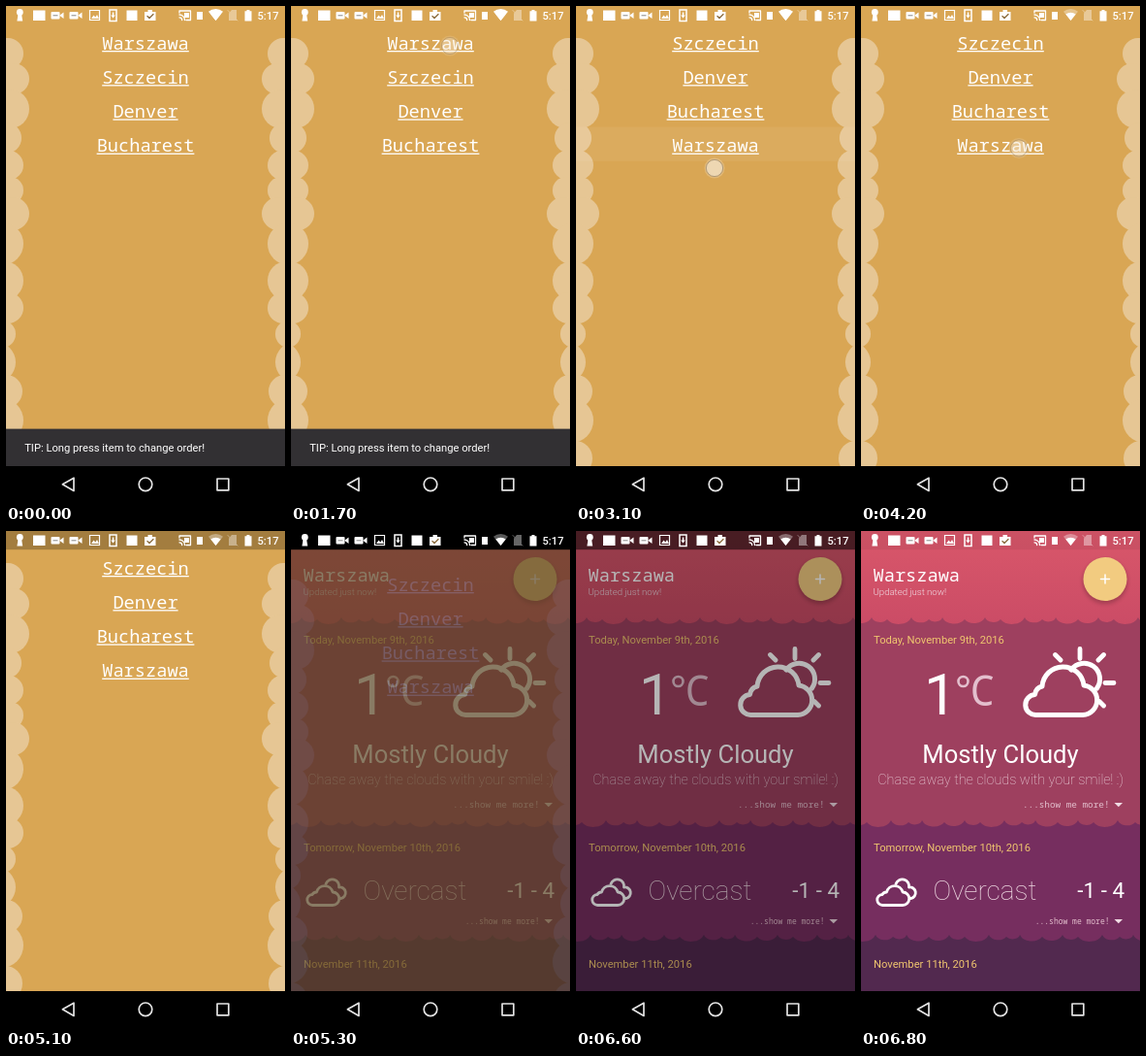
An HTML page for the animation above (6900 ms loop, 288 by 512 pixels).

```html
<!DOCTYPE html>
<html lang="en">
<head>
<meta charset="utf-8">
<title>City list and forecast</title>
<style>
  html, body { margin: 0; width: 100%; height: 100%; overflow: hidden; background: #000; }
  svg { display: block; width: 100vw; height: 100vh; }
  text { font-family: Roboto, sans-serif; fill: #fff; white-space: pre; }
  .mono { font-family: "Noto Sans Mono", monospace; }
  .city { font-size: 18.67px; }
  .body { font-size: 11.2px; }
  .date { font-size: 11.2px; fill: #efc56f; }
  .pale { fill: #e3bfcd; }
  .thin { font-weight: 100; fill: #f0dce4; }
  .line { fill: none; stroke: #fff; stroke-linecap: round; stroke-linejoin: round; }
</style>
</head>
<body>
<svg id="stage" viewBox="0 0 288 512" preserveAspectRatio="none"></svg>
<script>
const LOOP = 6900, STEP = 100, ROW = 35.2;
const stage = document.getElementById('stage');

const text = (x, y, cls, str, extra = '') =>
  `<text x="${x}" y="${y}" class="${cls}" ${extra}>${str}</text>`;
const rect = (x, y, w, h, fill, extra = '') =>
  `<rect x="${x}" y="${y}" width="${w}" height="${h}" fill="${fill}" ${extra}/>`;
const circle = (x, y, r, fill, extra = '') =>
  `<circle cx="${x}" cy="${y}" r="${r}" fill="${fill}" ${extra}/>`;
const path = (d, extra = 'fill="#fff"') => `<path d="${d}" ${extra}/>`;
const line = (d, width, extra = '') => path(d, `class="line" stroke-width="${width}" ${extra}`);

// Side bumps: centre y, radius, reach from the edge.
const bumps = [
  [49, 16, 18], [75, 16, 24], [106, 20, 24], [136, 16, 16], [164, 15, 18],
  [190, 14, 18], [214, 17, 24], [245, 22, 18], [283, 20, 18], [311, 16, 18],
  [338, 14, 10], [367, 21, 10], [397, 17, 17], [427, 23, 18], [466, 18, 17]
];
const sideClouds = bumps.map(([y, r, reach]) =>
  circle(reach - r, y, r, '#e6c694') + circle(288 - reach + r, y, r, '#e6c694')).join('');

// A band reaching down to y with a scalloped lower edge.
function band(y, fill, shift) {
  const widths = [21, 16, 25, 18, 14, 23];
  let d = `M-10 0V${y}`;
  for (let x = -10, i = shift; x < 300; i++) {
    const w = widths[i % widths.length];
    d += `a${w * .56} ${w * .42} 0 0 0 ${w} ${i % 2 ? 2 : -2}`;
    x += w;
  }
  return path(d + 'V0Z', `fill="${fill}"`);
}

const cities = ['Warszawa', 'Szczecin', 'Denver', 'Bucharest'];
const cityRow = (name, i) => {
  const w = name.length * 11.2;
  return `<g id="city${i}">` +
    text(144, 44.6, 'mono city', name, 'text-anchor="middle"') +
    rect(144 - w / 2, 46, w, 1.3, '#fff') + '</g>';
};

const list = `<g id="list">
  ${rect(0, -60, 288, 540, '#d9a654')}${sideClouds}
  ${rect(0, 19, 288, 35.2, '#fff', 'id="lift"')}
  ${cities.map(cityRow).join('')}
</g>`;

const more = (y, size) =>
  text(256.5, y, 'mono pale', '...show me more!', `font-size="${size}" text-anchor="end"`) +
  path(`M261.5 ${y - 5}h8.6l-4.3 4.3z`, 'fill="#f0dce4"');

const sunCloud =
  line('M181 189.5a10.5 10.5 0 0 1-1.5-21a10 10 0 0 1 7.5-8.5a21.6 21.6 0 0 1 43-1a15.3 15.3 0 0 1-1 30.5z', 5) +
  line('M217 143a15.5 15.5 0 0 1 26.5 19', 5) +
  line('M226 121.5v10M200.5 127.5l5.5 5.5M250.5 127.5l-5.5 5.5M252 156.5h9M246 175.5l4.5 4.5', 4.8);

const twoClouds =
  line('M22.5 385.5a5.5 5.5 0 0 1-.5-11a5 5 0 0 1 4.5-2.5a8.5 8.5 0 0 1 16.5 0a6.7 6.7 0 0 1 0 13.5z', 2.8) +
  line('M36 363.5a7 7 0 0 1 13.5 3.5a5.5 5.5 0 0 1 2 11.5', 2.8);

const forecast = `<g>
  ${rect(0, 0, 288, 474, '#52294f')}
  ${band(418, '#762e5f', 2)}${band(298, '#9e405f', 1)}${band(91, 'url(#sky)', 0)}
  ${text(12.5, 51.5, 'mono city', 'Warszawa')}
  ${text(12.5, 66, 'thin', 'Updated just now!', 'style="font-size:9.6px;font-weight:300"')}
  ${circle(252, 52, 23, '#000', 'opacity=".22" filter="url(#soft)"')}
  ${circle(252, 49.5, 22.5, '#f2cb80')}
  ${line('M247.5 49.5h9M252 45v9', 1.5)}
  ${text(13, 116, 'date', 'Today, November 9th, 2016')}
  ${text(65, 188.5, '', '1', 'font-size="60"')}
  ${circle(105.5, 155, 5, 'none', 'stroke="#e3bfcd" stroke-width="2.6"')}
  ${text(112.5, 180, 'mono pale', 'C', 'font-size="43" font-weight="300"')}
  ${sunCloud}
  ${text(144, 238.5, '', 'Mostly Cloudy', 'font-size="25.6" text-anchor="middle"')}
  ${text(144, 261, 'thin', 'Chase away the clouds with your smile! :)', 'font-size="14.4" text-anchor="middle"')}
  ${more(285, 9.33)}
  ${text(13, 330, 'date', 'Tomorrow, November 10th, 2016')}
  ${twoClouds}
  ${text(74.5, 379.5, 'thin', 'Overcast', 'font-size="28"')}
  ${text(272, 378, '', '-1 - 4', 'font-size="22.4" text-anchor="end"')}
  ${more(405, 8)}
  ${text(13, 450, 'date', 'November 11th, 2016')}
  ${rect(0, 0, 288, 474, '#000', 'id="dim"')}
  <g id="loader">${[0, 1, 2].map(() => circle(0, 0, 2, '#f2d58a')).join('')}</g>
</g>`;

const camera = x => rect(x, 6, 9, 7.5, '#fff', 'rx="1"') + path(`M${x + 9} 9.5l4-3v6.5l-4-3z`) +
  path(`M${x + 2} 9.7h5`, 'stroke="#0005" stroke-width="1.4"');
const statusIcons =
  circle(14.3, 6.5, 3.4, '#fff') + path('M12.6 8h3.4l1.2 7.5h-5.8z') +
  rect(28, 4.5, 12.5, 10.5, '#fff') + camera(46.5) + camera(65.5) +
  path('M86.5 4.5h10v10h-10z', 'fill="none" stroke="#fff" stroke-width="1.2"') +
  path('M88 13l2.5-3.5 1.8 2 1.7-2.5 2 4z') +
  path('M107 4h7v11.5h-7z', 'fill="none" stroke="#fff" stroke-width="1.5"') +
  path('M109.8 6.5h1.5v3h1.5l-2.3 3-2.3-3h1.6z') +
  rect(124.5, 4.5, 11, 10.5, '#fff') +
  path('M143 6h3.5v-2h4.5v2h3.5v9h-11.5z') + line('M146 10.5l2 2 4-4', 1.3, 'style="stroke:#8a6a3c"') +
  line('M179 7v-2h11.5v9.5h-4.5M179 9a5.5 5.5 0 0 1 5.5 5.5M179 11.8a2.7 2.7 0 0 1 2.7 2.7', 1.3) +
  rect(184, 7, 5, 5, '#fff') +
  rect(197, 6, 6, 8, '#fff') +
  path('M216.5 15l-7.5-9.3a12 12 0 0 1 15 0z', 'id="wifiFull" fill="#fff"') +
  path('M216.5 15l-5.2-6.4a8.3 8.3 0 0 1 10.4 0z') +
  `<g opacity=".4">${path('M230 7.5l3-3.5h5v11h-8z')}${line('M229 4.5l10 10.5', 1)}</g>` +
  path('M246.5 5.3h2v-1.3h3v1.3h2v10.2h-7z') +
  text(259.5, 13.8, 'body', '5:17', 'font-weight="500"');

const navBar = rect(0, 474, 288, 38, '#000') +
  `<g fill="none" stroke="#e4e4e4" stroke-width="1.7" stroke-linejoin="round">
    <path d="M70 486.2v13.2l-11.6-6.6z"/><circle cx="144" cy="492.8" r="6.8"/>
    <path d="M218 487h11.8v11.8h-11.8z"/></g>`;

stage.innerHTML = `
  <defs>
    <linearGradient id="sky" x2="0" y2="1">
      <stop stop-color="#d9576a"/><stop offset="1" stop-color="#cb4c66"/></linearGradient>
    <filter id="soft" x="-30%" y="-30%" width="160%" height="160%"><feGaussianBlur stdDeviation="2"/></filter>
  </defs>
  ${forecast}${list}
  <g id="snack">${rect(0, 435.6, 288, 38.4, '#323033')}
    ${text(19.2, 459, 'body', 'TIP: Long press item to change order!')}</g>
  ${rect(0, 0, 288, 19.2, '#000', 'id="bar"')}${statusIcons}
  <g id="touch">${circle(0, 0, 10.5, '#fff', 'opacity=".2"')}
    ${circle(0, 0, 8.6, '#f6e8d2', 'fill-opacity=".65" stroke="#84796a" stroke-opacity=".55"')}</g>
  ${navBar}`;

const el = id => document.getElementById(id);
const move = (node, x, y) => node.setAttribute('transform', `translate(${x} ${y})`);
const fade = (node, value) => node.setAttribute('opacity', value);
const clamp = v => Math.max(0, Math.min(1, v));

// Linear track through [time, value] pairs.
function track(t, ...keys) {
  if (t <= keys[0][0]) return keys[0][1];
  for (let i = 1; i < keys.length; i++) {
    const [a, from] = keys[i - 1], [b, to] = keys[i];
    if (t < b) return from + (to - from) * (t - a) / (b - a);
  }
  return keys[keys.length - 1][1];
}

const rows = cities.map((_, i) => el('city' + i));
const dots = [...el('loader').children];
const [listLayer, lift, snack, bar, dim, touch, wifiFull, loader] =
  ['list', 'lift', 'snack', 'bar', 'dim', 'touch', 'wifiFull', 'loader'].map(el);

function draw(t) {
  // Long press, then drag the first city to the bottom.
  const passed = [0, 2500, 2650, 2800];
  const dragY = track(t, [2300, 0], [2400, 8], [2900, 96], [3000, 3 * ROW]);
  move(rows[0], 0, dragY);
  for (let i = 1; i < 4; i++) move(rows[i], 0, ROW * (i - clamp((t - passed[i]) / 150)));
  move(lift, 0, dragY);
  fade(lift, track(t, [2300, 0], [2400, .06], [3200, .06], [3500, 0]));

  move(snack, 0, track(t, [2500, 0], [2800, 39]));
  snack.style.display = t < 2800 ? '' : 'none';

  const dragging = t >= 1700 && t < 3500, tapping = t >= 4200 && t < 4500;
  fade(touch, dragging ? track(t, [1700, .6], [1800, 1], [3300, 1], [3500, 0])
    : tapping ? track(t, [4200, .7], [4300, 1], [4500, .4]) : 0);
  if (tapping) move(touch, track(t, [4200, 163], [4400, 150]), 146.5);
  else move(touch, track(t, [2200, 164], [3100, 143]),
    track(t, [2100, 41], [2300, 53], [3000, 160], [3100, 167], [3300, 197]));

  // The list sinks and fades, leaving the dimmed forecast.
  fade(listLayer, track(t, [5100, 1], [5200, .68], [5300, .28], [5400, .08], [5500, 0]));
  move(listLayer, 0, track(t, [5100, 0], [5200, 6], [5300, 17], [5500, 38]));
  listLayer.style.display = t < 5500 ? '' : 'none';

  fade(dim, track(t, [6400, .58], [6800, 0]));
  fade(bar, t < 5100 ? 0 : track(t, [5100, .25], [5200, .8], [5300, 1], [6400, 1], [6800, .06]));
  fade(wifiFull, t < 4000 ? 1 : .35);

  // Three dots circle and gather into one.
  const spread = track(t, [5800, 24], [6100, 20], [6400, 0]);
  fade(loader, t >= 5800 && t <= 6400 ? 1 : 0);
  move(loader, track(t, [5800, 144], [6400, 153]), track(t, [5800, 256], [6400, 258.5]));
  dots.forEach((dot, i) => {
    const angle = i * Math.PI * 2 / 3 + t / 130;
    move(dot, spread * Math.cos(angle), spread * Math.sin(angle));
  });
}

const start = performance.now();
function frame() {
  const t = (performance.now() - start) % LOOP;
  draw(Math.floor(t / STEP) * STEP);
  requestAnimationFrame(frame);
}
frame();
</script>
</body>
</html>
```
